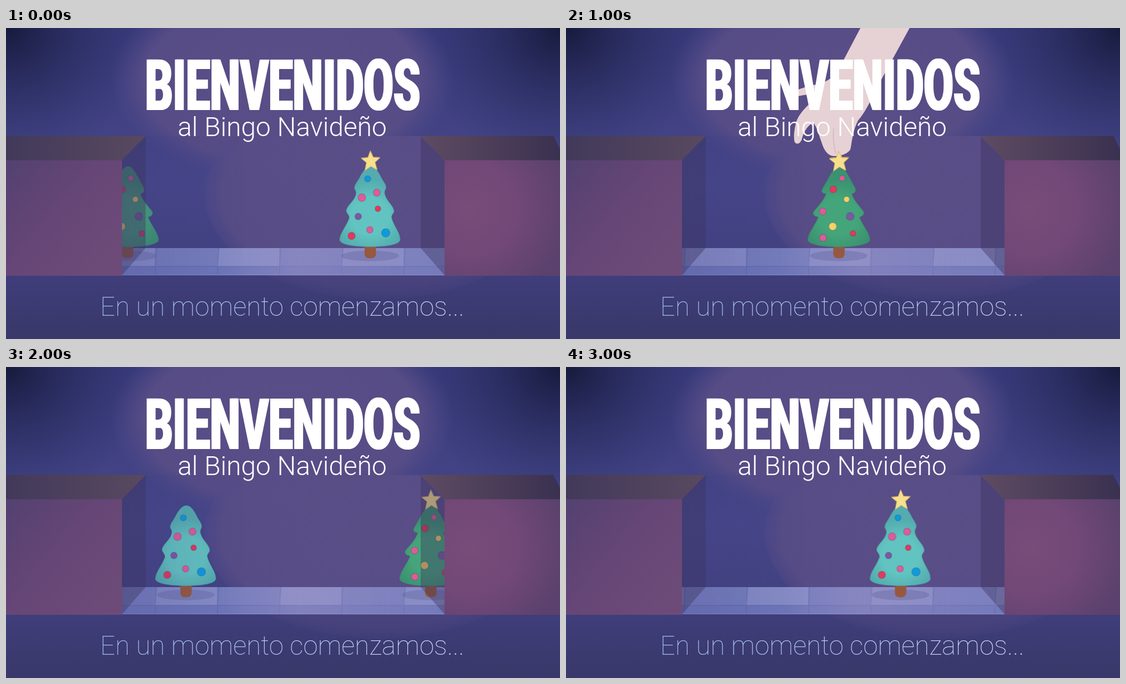
Animation of 998x561 px, one loop 3.2 s. Source, as an HTML page:

```html
<!DOCTYPE html>
<html lang="es">
<head>
<meta charset="utf-8">
<title>Bingo Navideño</title>
<style>
  html, body { margin: 0; width: 100%; height: 100%; overflow: hidden; background: #3d3c78; }
  svg { display: block; width: 100vw; height: 100vh; }
  text { font-family: Roboto, "Open Sans", sans-serif; text-anchor: middle; fill: #fff; }
  .title { font-size: 77.5px; font-weight: 900; }
  .sub { font-size: 47.8px; font-weight: 300; }
  .wait { font-size: 47.6px; font-weight: 100; fill: url(#ice); }

  .tree { animation: ride 3.2s steps(2) infinite; }
  .tree .star { animation: crown 3.2s step-end infinite; }
  .late, .late .star { animation-delay: -1.6s; }
  .belt { animation: roll .8s steps(4) infinite; }
  .hand { transform-origin: 584px 0; animation: reach 1.6s step-end infinite; }
  .grip { animation: hold 1.6s step-end infinite; }
  .open { animation: release 1.6s step-end infinite; }

  @keyframes ride {
    0% { transform: translateX(219px); }
    12.5% { transform: translateX(324px); }
    25% { transform: translateX(434px); }
    37.5% { transform: translateX(549px); }
    50% { transform: translateX(656px); }
    62.5% { transform: translateX(765px); }
    75%, 100% { transform: translateX(875px); }
  }
  @keyframes crown { 0% { opacity: 0; } 31.25%, 100% { opacity: 1; } }
  @keyframes roll { to { transform: translateX(224px); } }
  @keyframes reach {
    0% { transform: translateY(-400px); }
    37.5% { transform: translate(0, -75px); }
    50% { transform: none; }
    62.5% { transform: translate(-6px, 76px); }
    75% { transform: translate(53px, 0) rotate(-2deg); }
    87.5%, 100% { transform: translateY(-400px); }
  }
  @keyframes hold { 0% { opacity: 1; } 75%, 100% { opacity: 0; } }
  @keyframes release { 0% { opacity: 0; } 75%, 100% { opacity: 1; } }

  .red { fill: #e2395c; }
  .pink { fill: #de5c98; }
  .gold { fill: #f2d365; }
  .plum { fill: #7a5aa0; }
  .blue { fill: #0d9bdc; }
  .balls { stroke: #35306a; stroke-opacity: .22; stroke-width: 1.5; }
</style>
</head>
<body>
<svg viewBox="0 0 998 561" preserveAspectRatio="none">
  <defs>
    <linearGradient id="base" x2="0" y2="1">
      <stop stop-color="#3a3b7c"/>
      <stop offset=".5" stop-color="#464689"/>
      <stop offset=".8" stop-color="#41407e"/>
      <stop offset="1" stop-color="#393869"/>
    </linearGradient>
    <radialGradient id="dark">
      <stop stop-color="#171a3c"/>
      <stop offset=".35" stop-color="#20244f" stop-opacity=".7"/>
      <stop offset="1" stop-color="#2c3068" stop-opacity="0"/>
    </radialGradient>
    <radialGradient id="glow">
      <stop stop-color="#5a4e87"/>
      <stop offset=".8" stop-color="#584d86" stop-opacity=".95"/>
      <stop offset="1" stop-color="#504a88" stop-opacity="0"/>
    </radialGradient>
    <radialGradient id="spot">
      <stop stop-color="#5a4e87"/>
      <stop offset=".9" stop-color="#584d86" stop-opacity=".95"/>
      <stop offset="1" stop-color="#544b87" stop-opacity=".4"/>
    </radialGradient>
    <linearGradient id="foot" x2="0" y2="1">
      <stop stop-color="#3d3c78" stop-opacity=".55"/>
      <stop offset="1" stop-color="#39386a" stop-opacity=".95"/>
    </linearGradient>
    <linearGradient id="faceL" x2="1" y2=".8">
      <stop stop-color="#534170"/>
      <stop offset=".5" stop-color="#664676"/>
      <stop offset="1" stop-color="#6d4b79"/>
    </linearGradient>
    <radialGradient id="faceR" cx=".22" cy=".42" r=".85">
      <stop stop-color="#794c79"/>
      <stop offset=".5" stop-color="#714877"/>
      <stop offset="1" stop-color="#5b416d"/>
    </radialGradient>
    <linearGradient id="lidL">
      <stop stop-color="#42395a"/>
      <stop offset="1" stop-color="#58495f"/>
    </linearGradient>
    <linearGradient id="lidR">
      <stop stop-color="#5e4b62"/>
      <stop offset="1" stop-color="#3a3150"/>
    </linearGradient>
    <linearGradient id="shade">
      <stop stop-color="#3f3f86" stop-opacity=".22"/>
      <stop offset="1" stop-color="#3f3f86" stop-opacity="0"/>
    </linearGradient>
    <linearGradient id="warm">
      <stop offset=".3" stop-color="#a996c8" stop-opacity="0"/>
      <stop offset=".55" stop-color="#a996c8" stop-opacity=".35"/>
      <stop offset="1" stop-color="#9a8fc4" stop-opacity=".15"/>
    </linearGradient>
    <radialGradient id="green" gradientUnits="userSpaceOnUse" cx="0" cy="340" r="66">
      <stop offset=".5" stop-color="#45a57a"/>
      <stop offset="1" stop-color="#3b9270"/>
    </radialGradient>
    <radialGradient id="teal" gradientUnits="userSpaceOnUse" cx="0" cy="340" r="66">
      <stop offset=".5" stop-color="#62c4c0"/>
      <stop offset="1" stop-color="#54acae"/>
    </radialGradient>
    <linearGradient id="ice">
      <stop stop-color="#9fbcee"/>
      <stop offset="1" stop-color="#ccdaf8"/>
    </linearGradient>
    <pattern id="tiles" x="44" y="397" width="224" height="50" patternUnits="userSpaceOnUse">
      <path fill="#767ebd" d="M0 0H224V50H0z"/>
      <path fill="#868cc6" d="M116 0H224V33H112z"/>
      <path fill="#6570b4" fill-opacity=".45" d="M0 33H224V50H0z"/>
      <path fill="none" stroke="#5c64a8" stroke-opacity=".45" stroke-width="2"
        d="M0 33H224M3 0L1 33V50M115 0L113 33V50"/>
    </pattern>
    <clipPath id="hall"><path d="M209 195H790V447H209z"/></clipPath>
    <clipPath id="low"><path d="M0 195H998V561H0z"/></clipPath>

    <path id="star" stroke="#d9b96a" stroke-linejoin="round" fill="#f8df8b"
      d="M0-18.500L4.800-6.600 17.200-5.800 7.700 2.500 11 16.500 0 9.500-11 16.500-7.700 2.500-17.200-5.800-4.800-6.600z"/>
    <g id="stand">
      <ellipse cy="411" rx="52" ry="9.5" fill="#51558f" fill-opacity=".27"/>
      <path fill="#96593f" d="M-10 393H10.5V408Q10 415.5 0 415.5T-10 408z"/>
    </g>
  </defs>

  <path fill="url(#base)" d="M0 0H998V561H0z"/>
  <ellipse cx="0" cy="0" rx="265" ry="250" fill="url(#dark)"/>
  <ellipse cx="998" cy="0" rx="265" ry="250" fill="url(#dark)"/>
  <ellipse cx="497" cy="95" rx="310" ry="185" fill="url(#glow)"/>
  <g clip-path="url(#low)">
    <ellipse cx="670" cy="300" rx="312" ry="190" fill="url(#spot)"/>
  </g>
  <path fill="url(#foot)" d="M0 447H998V561H0z"/>

  <g clip-path="url(#hall)">
    <path class="belt" fill="url(#tiles)" d="M-224 397H850V446H-224z"/>
    <path fill="url(#warm)" d="M209 397H790V446H209z"/>
    <path stroke="#9aa0d4" stroke-opacity=".6" d="M209 445.5H790"/>

    <g class="tree">
      <use href="#stand"/>
      <path fill="url(#green)" stroke="#37866b" stroke-opacity=".6" d="M1 249.5C9 250 15 263 21 273C25 281 31 289 30 294Q28 299 23 299C28 313 38 322 45 332Q46 339 37 341C42 355 55 369 56 382C55 391 28 395 0 395C-28 395-55 391-56 382C-55 369-42 355-37 341Q-48 339-46 332C-38 322-28 313-23 299Q-31 298-31 294C-30 289-24 281-20 273C-14 263-8 250 1 249.5z"/>
      <g class="balls">
        <circle class="pink" cx="6" cy="271" r="5"/>
        <circle class="red" cx="-10" cy="291" r="6.3"/>
        <circle class="gold" cx="14" cy="309" r="5.2"/>
        <circle class="pink" cx="-29" cy="331" r="6.3"/>
        <circle class="plum" cx="20.5" cy="340" r="7.2"/>
        <circle class="gold" cx="-11" cy="358" r="7"/>
        <circle class="red" cx="25.5" cy="370.5" r="5.2"/>
        <circle class="pink" cx="-28.5" cy="378.5" r="6.3"/>
      </g>
      <g class="star"><use href="#star" transform="translate(1 240)rotate(-2)"/></g>
    </g>

    <g class="tree late">
      <use href="#stand"/>
      <path fill="url(#teal)" stroke="#4c9da3" stroke-opacity=".6" d="M1 250C10 250 16 262 20 270C24 278 30 283 28 290C26 294 25 296 27 302C31 314 42 320 43 331C42 335 37 338 39 344C43 358 54 369 54 382C53 391 28 394.5 0 394.5C-28 394.5-54 391-55 382C-54 369-43 358-38 344C-36 338-42 335-43 330C-42 320-30 314-26 302C-24 296-26 294-28 290C-29 283-23 278-19 270C-15 262-8 250 1 250z"/>
      <g class="balls">
        <circle class="blue" cx="-4.5" cy="272" r="5.5"/>
        <circle class="pink" cx="12" cy="297" r="6.5"/>
        <circle class="pink" cx="-15" cy="306" r="7"/>
        <circle class="red" cx="14" cy="326" r="5.2"/>
        <circle class="plum" cx="-21.5" cy="340" r="6"/>
        <circle class="pink" cx="-.5" cy="364" r="6"/>
        <circle class="blue" cx="28" cy="369.5" r="7.6"/>
        <circle class="red" cx="-33.5" cy="375" r="6.6"/>
      </g>
      <g class="star"><use href="#star" transform="translate(1 240)rotate(-2)"/></g>
    </g>
    <path fill="url(#shade)" d="M209 195H430V447H209z"/>
  </g>

  <!-- tunnel ends -->
  <g fill="#3d345c" fill-opacity=".4">
    <path d="M209 238L251.500 195V397L209 446z"/>
    <path d="M790 238L747 195V397L790 446z"/>
  </g>
  <path fill="url(#faceL)" d="M0 238H209V447H0z"/>
  <path fill="url(#faceR)" d="M790 238H998V447H790z"/>
  <path fill="url(#lidL)" d="M0 194.500H251.500L209 238.500H0z"/>
  <path fill="url(#lidR)" d="M747 194.500H986L998 218V238.500H790z"/>

  <g class="hand" fill="#e6d1d4">
    <path d="M497-1C490 12 477 20 462 25C444 28 419 35 416 41C414 47 421 48 429 46C439 44 449 43 457 47C447 60 429 73 422 90C418 101 415 121 418 130C423 136 429 131 431 124C434 111 441 100 452 94C480 104 515 108 532 91C547 74 558 48 570 25Q577 11 584-1L660-140H570z"/>
    <g class="grip">
      <path d="M450 92C459 104 462 119 467 132C471 145 478 154 487 155C500 156 518 150 519 140C522 121 524 107 532 91L500 80z"/>
      <path fill="none" stroke="#cbaeb9" stroke-width="1.500" stroke-opacity=".7" d="M488 105Q486 130 492 150"/>
      <use href="#star" transform="translate(498 165)rotate(-3)"/>
    </g>
    <path class="open" d="M447 92C456 106 455 130 463 143Q470 149 474 141C477 126 478 110 486 98L512 99C519 110 518 128 525 135Q534 140 539 128C545 112 545 92 538 78z"/>
  </g>

  <g transform="translate(498.500 148)scale(1 1.66)">
    <text id="hi" class="title">BIENVENIDOS</text>
    <use href="#hi" x="-1.4" aria-hidden="true"/>
    <use href="#hi" x="1.4" aria-hidden="true"/>
  </g>
  <text class="sub" x="497.500" y="194.500">al Bingo Navideño</text>
  <text class="wait" x="497.500" y="518.500">En un momento comenzamos...</text>
</svg>
</body>
</html>
```
